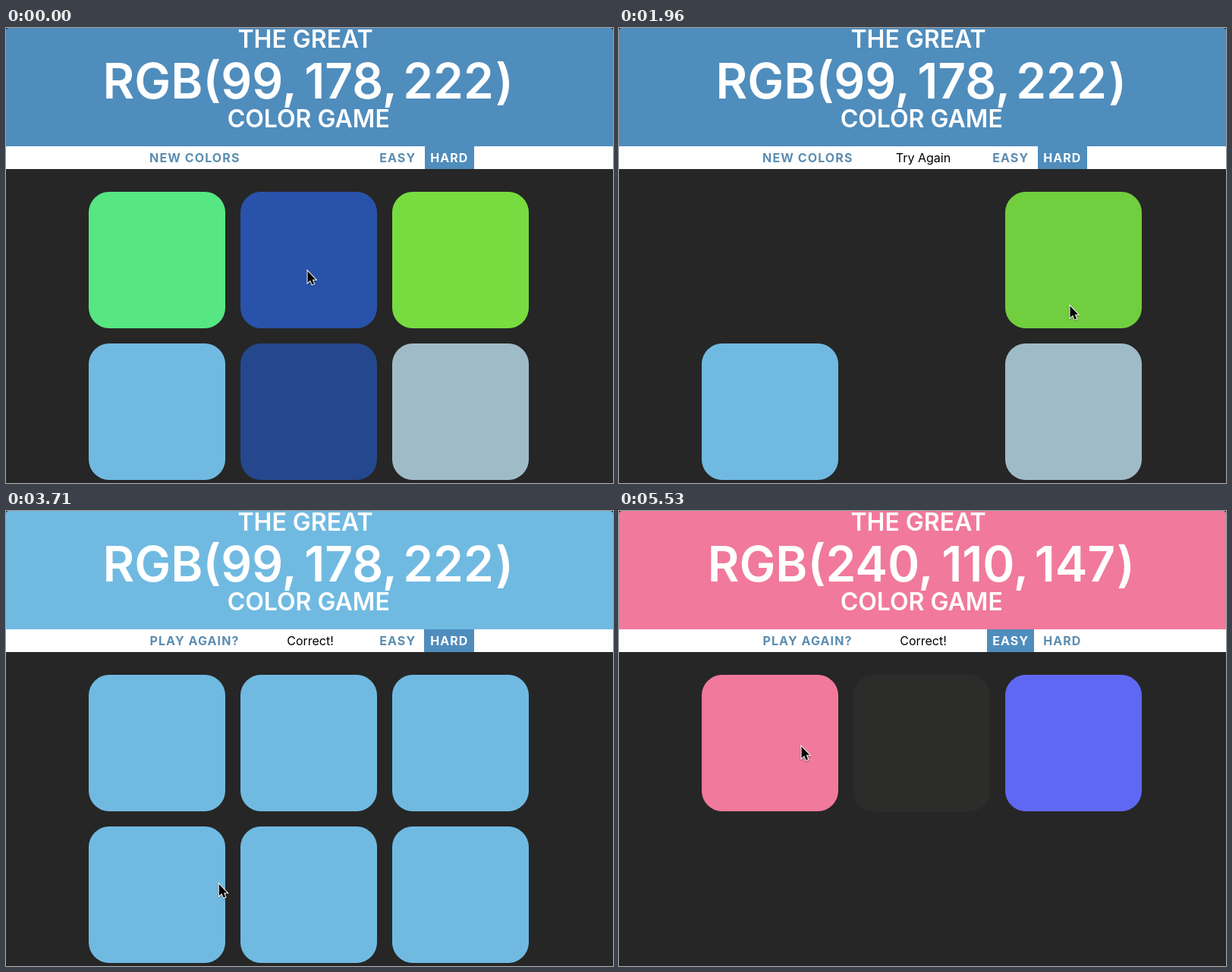
These frames come from a looping animation (800 px wide and 600 px high, 5.6 s). An HTML page with a canvas:

```html
<!DOCTYPE html>
<html lang="en">
<head>
<meta charset="utf-8">
<title>Color game</title>
<style>
  html, body { margin: 0; width: 100%; height: 100%; overflow: hidden; background: #181818; }
  canvas { display: block; }
</style>
</head>
<body>
<canvas id="stage" width="800" height="600"></canvas>
<script>
const ctx = document.getElementById('stage').getContext('2d');
const LOOP = 5600, STEP = 70, FADE = 400;
const WIN_HARD = 3080, HOVER_EASY = 4380, CLICK_EASY = 4550, WIN_EASY = 5520;

const DARK = [38, 38, 38], STEEL = [79, 141, 189], SKY = [112, 186, 226];
const PINK = [241, 121, 156], WHITE = [255, 255, 255], LABEL = [91, 141, 176];

// Each tile: first colour, then [time, new colour] changes.
const tiles = [
  [[86, 231, 130], [508, DARK], [WIN_HARD, SKY], [CLICK_EASY, PINK]],
  [[41, 82, 170], [840, DARK], [WIN_HARD, SKY], [CLICK_EASY, [130, 190, 110]], [5220, DARK], [WIN_EASY, PINK]],
  [[119, 220, 64], [1925, DARK], [WIN_HARD, SKY], [CLICK_EASY, [93, 104, 243]], [WIN_EASY, PINK]],
  [SKY],
  [[37, 71, 141], [1350, DARK], [WIN_HARD, SKY]],
  [[160, 187, 200], [2418, DARK], [WIN_HARD, SKY]]
];

// Pointer stops: time, x, y.
const stops = [
  [0, 397, 320], [400, 222, 326], [530, 222, 328], [700, 397, 336],
  [860, 398, 340], [1260, 402, 492], [1390, 404, 494], [1820, 594, 364],
  [1960, 594, 366], [2350, 607, 506], [2470, 607, 508], [2950, 276, 499],
  [3640, 275, 499], [4430, 513, 166], [4620, 513, 166], [5080, 400, 304],
  [5240, 398, 308], [5470, 240, 310], [5600, 240, 310]
];

const clamp = v => Math.min(1, Math.max(0, v));
const rgb = c => `rgb(${c.map(Math.round)})`;
const mix = (a, b, p) => a.map((v, i) => v + (b[i] - v) * p);

// The CSS "ease" curve: cubic-bezier(.25, .1, .25, 1).
function ease(x) {
  x = clamp(x);
  let lo = 0, hi = 1, s;
  for (let i = 0; i < 16; i++) {
    s = (lo + hi) / 2;
    const bx = .75 * s * (1 - s) + s ** 3;
    if (bx < x) lo = s; else hi = s;
  }
  return x === 0 || x === 1 ? x : .3 * s * (1 - s) ** 2 + 3 * s * s * (1 - s) + s ** 3;
}

const fade = (t, start, duration = FADE) => ease((t - start) / duration);

function rect(color, x, y, w, h, r = 0) {
  ctx.fillStyle = rgb(color);
  ctx.beginPath();
  ctx.roundRect(x, y, w, h, r);
  ctx.fill();
}

// Centres the visible ink of the text on cx.
function text(str, cx, y, font, color, spacing = 0) {
  ctx.font = `${font} Inter, sans-serif`;
  ctx.letterSpacing = `${spacing}px`;
  ctx.fillStyle = rgb(color);
  const m = ctx.measureText(str);
  ctx.fillText(str, cx + (m.actualBoundingBoxLeft - m.actualBoundingBoxRight) / 2, y);
}

function header(t, won) {
  const easy = t >= CLICK_EASY;
  rect(won ? (easy ? PINK : SKY) : STEEL, 0, 0, 800, 156);
  text('THE GREAT', 394.5, 26, '600 32px', WHITE);
  const words = easy
    ? [['RGB(240,', 265], ['110,', 481], ['147', 601], [')', 666.5]]
    : [['RGB(99,', 255], ['178,', 453], ['222', 583], [')', 655.5]];
  for (const [word, cx] of words) text(word, cx, 93, '600 64px', WHITE);
  text('COLOR GAME', 398.5, 131, '600 32px', WHITE);
}

function modeButton(label, x, w, cx, selected) {
  rect(mix(WHITE, STEEL, selected), x, 156, w, 30);
  text(label, cx, 177, '700 16px', mix(LABEL, WHITE, selected), 1.1);
}

function menu(t, won) {
  rect(WHITE, 0, 156, 800, 30);
  const shift = won ? 1 : 0;
  text(won ? 'PLAY AGAIN?' : 'NEW COLORS', 248.5, 177, '700 16px', LABEL, 1.1);
  const missed = t >= 508 && t < CLICK_EASY || t >= 5220;
  if (missed) text(won ? 'Correct!' : 'Try Again', 400.7, 177, '400 16px', [0, 0, 0]);
  modeButton('EASY', 486 - shift, 62, 516.3, fade(t, HOVER_EASY, 140));
  modeButton('HARD', 552 - shift, 65 + shift, 584, 1 - fade(t, CLICK_EASY));
}

function board(t) {
  const count = t >= CLICK_EASY ? 3 : 6;
  tiles.slice(0, count).forEach(([first, ...changes], i) => {
    const color = changes.reduce((c, [start, next]) => mix(c, next, fade(t, start)), first);
    rect(color, 109 + i % 3 * 200, 216 + Math.floor(i / 3) * 200, 180, 180, 27);
  });
}

function pointer(t) {
  const i = stops.findIndex(s => s[0] > t);
  const [t0, ...from] = stops[i - 1], [t1, ...to] = stops[i];
  const p = (t - t0) / (t1 - t0);
  const [x, y] = mix(from, to, p * p * (3 - 2 * p));
  ctx.save();
  ctx.translate(x + .5, y + .5);
  ctx.shadowColor = 'rgba(0,0,0,.4)';
  ctx.shadowBlur = 2;
  ctx.shadowOffsetY = 1;
  const arrow = new Path2D('M0 0V15.5L3.6 12.2 6 18 8.6 17 6.2 11.3H10.7Z');
  ctx.lineWidth = 2;
  ctx.strokeStyle = '#fff';
  ctx.stroke(arrow);
  ctx.shadowColor = 'transparent';
  ctx.fillStyle = '#000';
  ctx.fill(arrow);
  ctx.restore();
}

function draw() {
  const t = Math.floor(performance.now() % LOOP / STEP) * STEP;
  const won = t >= WIN_HARD && t < CLICK_EASY || t >= WIN_EASY;
  rect([24, 24, 24], 0, 0, 800, 600);
  ctx.save();
  ctx.beginPath();
  ctx.roundRect(0, 0, 800, 600, 4);
  ctx.clip();
  rect(DARK, 0, 0, 800, 600);
  header(t, won);
  menu(t, won);
  board(t);
  pointer(t);
  ctx.restore();
  requestAnimationFrame(draw);
}
draw();
</script>
</body>
</html>
```
